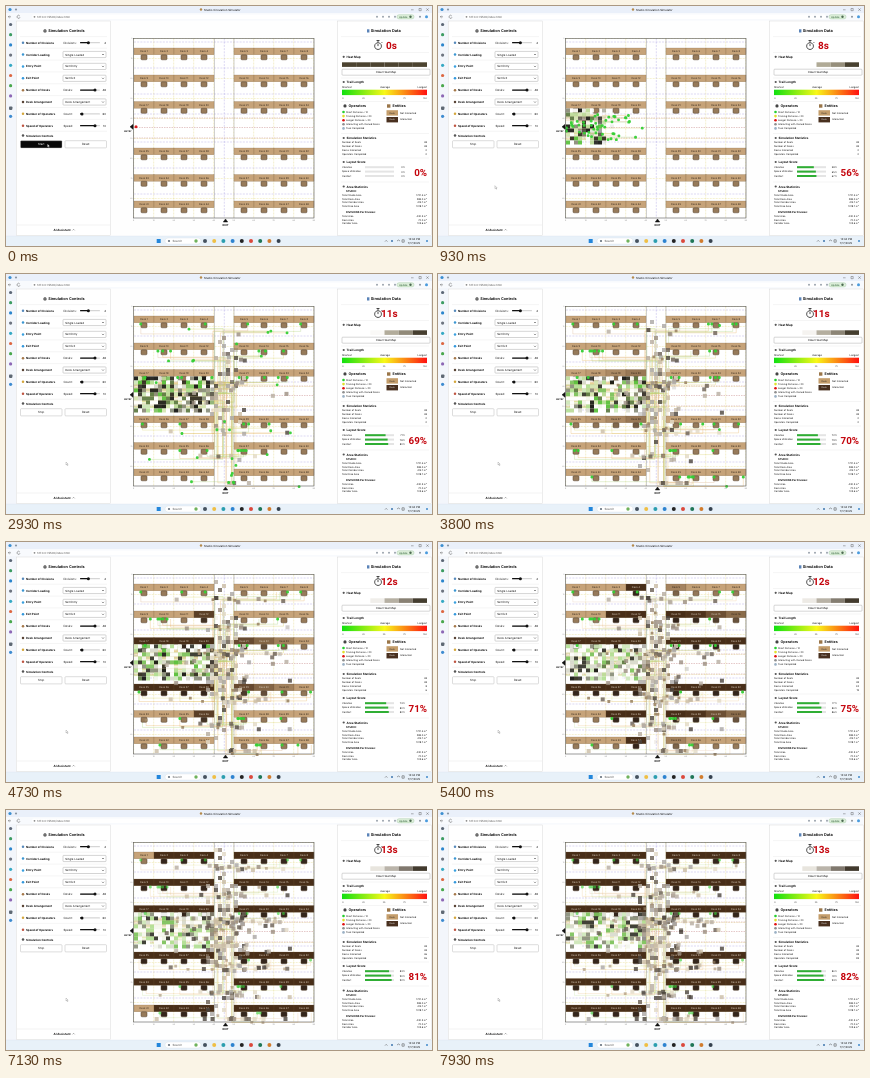
Write an HTML page that moves like this. It is 426 by 240 pixels and loops after 8 s.

```html
<!DOCTYPE html>
<html lang="en">
<head>
<meta charset="utf-8">
<title>Studio Circulation Simulator</title>
<style>
html, body { margin: 0; width: 100%; height: 100%; overflow: hidden; background: #fdfdfd; }
svg { display: block; width: 100vw; height: 100vh; font-family: Inter, "Open Sans", sans-serif; }
text { text-rendering: geometricPrecision; }
</style>
</head>
<body>
<svg id="stage" viewBox="0 0 426 240"></svg>
<script>
const LOOP = 8000, STEP = 1000 / 15;
const stage = document.getElementById('stage');

function el(tag, attrs, parent = stage) {
  const node = document.createElementNS('http://www.w3.org/2000/svg', tag);
  for (const k in attrs) node.setAttribute(k, attrs[k]);
  parent.append(node);
  return node;
}
const group = () => el('g', {});
const rect = (x, y, width, height, fill, more, parent) =>
  el('rect', { x, y, width, height, fill, ...more }, parent);
const dot = (cx, cy, r, fill, parent) => el('circle', { cx, cy, r, fill }, parent);
const path = (d, stroke, more, parent) =>
  el('path', { d, stroke, fill: 'none', 'stroke-width': 0.5, ...more }, parent);
function text(x, y, str, size = 2.6, more, parent) {
  const node = el('text', { x, y, 'font-size': size, fill: '#111', ...more }, parent);
  node.textContent = str;
  return node;
}
const bold = { 'font-weight': 700 };
const mid = { 'text-anchor': 'middle' };
const end = { 'text-anchor': 'end' };
const clamp = (v, a = 0, b = 1) => Math.max(a, Math.min(b, v));
const hash = n => { const s = Math.sin(n * 127.1 + 11.7) * 43758.5453; return s - Math.floor(s); };
const pick = (list, r) => list[Math.floor(r * list.length)];

// Piecewise linear value through [time, value] pairs
function along(points, t) {
  for (let i = 1; i < points.length; i++) {
    const [t0, a] = points[i - 1], [t1, b] = points[i];
    if (t <= t1) return a + (b - a) * clamp((t - t0) / (t1 - t0));
  }
  return points[points.length - 1][1];
}
function mix(a, b, k) {
  return 'rgb(' + a.map((v, i) => Math.round(v + (b[i] - v) * k)).join() + ')';
}

function drawBrowser() {
  rect(0, 0, 426, 240, '#fefefe');
  rect(0, 0, 426, 7, '#eaf0fa');
  rect(0, 7, 426, 7.5, '#f8fafd');
  rect(0, 14, 10, 216, '#f3f6fb');
  rect(26, 8.5, 362, 4.6, '#fff', { rx: 2.3 });
  dot(4, 3.5, 1.6, '#3d8fd0');
  dot(10, 3.5, 1.1, '#8a96a4');
  dot(195, 3.5, 1.2, '#b58a4c');
  text(198, 4.6, 'Studio Circulation Simulator', 2.8);
  path('M405 3.8h2.6M413 2.5h2.2v2.2h-2.2zM420.3 2.4l2.4 2.4m0-2.4l-2.4 2.4', '#444', { 'stroke-width': 0.4 });
  path('M5 10.8h-2.6l1.1-1.1m-1.1 1.1l1.1 1.1M13.8 10a1.5 1.5 0 1 0 .2 1.2', '#555');
  dot(28.5, 10.8, 0.9, '#888');
  text(31, 11.8, '127.0.0.1:5500/index.html', 2.8, { fill: '#555' });
  for (let i = 0; i < 4; i++) dot(371 + i * 6, 10.8, 1, '#9aa3ad');
  rect(391, 8.7, 17, 4.2, '#dff0dc', { rx: 2.1, stroke: '#7ab07a', 'stroke-width': 0.3 });
  text(393, 11.8, 'Update', 2.5, { fill: '#285c30' });
  dot(404.5, 10.8, 1.2, '#4b6a50');
  dot(414, 10.8, 1, '#8a929c');
  dot(420.5, 10.8, 1.5, '#4a9bdd');
  ['#5b6675', '#3c9c62', '#2b85cc', '#6d7480', '#36a9c4', '#dd6640', '#49a84c', '#8d67b5', '#5f6974', '#3e8bd0']
    .forEach((c, i) => i === 8 ? rect(3, 100.5, 3.4, 3.4, c, { rx: 0.8 }) : dot(4.6, 18.5 + i * 10.2, 1.6, c));

  rect(0, 230, 426, 10, '#e8f1f9');
  path('M0 230H426', '#d3deea', { 'stroke-width': 0.3 });
  rect(150.7, 233, 4, 4, '#2386db');
  rect(159, 232, 36, 6, '#fff', { rx: 3, stroke: '#cdd6e0', 'stroke-width': 0.3 });
  dot(163, 235, 1.1, '#64707c');
  text(166.5, 236, 'Search', 2.9, { fill: '#555' });
  dot(190, 235, 1.7, '#6fb25c');
  ['#45525f', '#efbf45', '#2b9eaf', '#2d83d0', '#232323', '#db483c', '#1f7657', '#d17c2d', '#36424f']
    .forEach((c, i) => dot(199 + i * 9.2, 235, 2, c));
  path('M379 235.6l1.2-1.2 1.2 1.2', '#444');
  dot(386, 235, 1, '#3e74ad');
  path('M391 235q1.5-2 3 0M396 233.8v2.4h2.2v-2.4z', '#444');
  text(414, 234.4, '12:34 PM', 2.6, end);
  text(414, 237.8, '7/17/2025', 2.6, end);
  dot(421, 235, 1, '#4088ca');
}

function slider(y, label, value, k) {
  text(57.5, y + 1, label, 2.9);
  rect(74, y - 0.6, 20, 1.2, '#d5d5d5', { rx: 0.6 });
  rect(74, y - 0.6, 20 * k, 1.2, '#111', { rx: 0.6 });
  dot(74 + 20 * k, y, 1.5, '#111');
  text(100, y + 1, value, 2.8, end);
}
function select(y, value) {
  rect(57, y - 3.1, 43, 6.2, '#fff', { stroke: '#a8a8a8', 'stroke-width': 0.5, rx: 0.7 });
  text(59.3, y + 1, value, 2.8);
  path(`M96 ${y - 0.5}l1 1 1-1`, '#222', { 'stroke-width': 0.5 });
}

function drawControls() {
  rect(10.5, 15, 94, 214.5, '#fff', { stroke: '#cfcfcf', 'stroke-width': 0.4 });
  dot(39, 24.9, 1.6, '#333');
  dot(39, 24.9, 0.6, '#fff');
  text(42.3, 26.3, 'Simulation Controls', 3.8, bold);
  path('M14 30.6H101', '#ddd', { 'stroke-width': 0.3 });
  const rows = ['Number of Divisions', 'Corridor Loading', 'Entry Point', 'Exit Point', 'Number of Desks',
    'Desk Arrangement', 'Number of Operators', 'Speed of Operators', 'Simulation Controls'];
  const tints = ['#5689bb', '#3b96d2', '#39a0df', '#3297dc', '#a47748', '#5b4638', '#d4a63c', '#be5542', '#555'];
  rows.forEach((label, i) => {
    const y = i < 8 ? 36.7 + i * 11.86 : 129.6;
    dot(17, y, 1.25, tints[i]);
    text(20, y + 1, label, 2.85, bold);
    if (i < 8) path(`M14 ${y + 5.5}H101`, '#ddd', { 'stroke-width': 0.3 });
  });
  slider(36.7, 'Divisions:', 4, 0.42);
  select(48.5, 'Single Loaded');
  select(60.4, 'Set Entry');
  select(72.3, 'Set Exit');
  slider(84.1, 'Desks:', 48, 0.75);
  select(96, 'Desk Arrangement');
  slider(107.9, 'Count:', 60, 0.1);
  slider(119.7, 'Speed:', 10, 0.75);
  path('M11 219H104', '#ddd', { 'stroke-width': 0.4 });
  text(56, 224.8, 'AI Assistant', 2.9, { ...mid, ...bold });
  path('M66.5 224.4l1.1-1.1 1.1 1.1', '#333', { 'stroke-width': 0.4 });
}

function button(x) {
  const box = rect(x, 134.7, 41.5, 7.2, '#fff', { rx: 0.8, stroke: '#aaa', 'stroke-width': 0.4 });
  const label = text(x + 20.75, 139.3, 'Reset', 2.9, mid);
  return { box, label };
}

const divider = y => path(`M335 ${y}H423`, '#ddd', { 'stroke-width': 0.3 });
function heading(y, label, x = 340.5) {
  dot(x - 2.8, y - 1, 1.1, '#555');
  text(x, y, label, 3, bold);
}
const SMALL = 2.4;
function drawData() {
  rect(331.5, 15, 94.2, 214.5, '#fff', { stroke: '#cfcfcf', 'stroke-width': 0.4 });
  rect(361, 23.3, 2.4, 3.2, '#5a83b8');
  text(364.8, 26.3, 'Simulation Data', 3.9, bold);
  divider(30.6);
  path('M373.5 37.2a3.4 3.4 0 1 0 .1 0M372 35h3M373.5 35v2M373.5 40.6v-2.2M377 36.6l.8.8', '#222', { 'stroke-width': 0.8, transform: 'translate(-1.5 -.5)' });
  divider(46.5);
  heading(51.8, 'Heat Map');
  rect(336, 63.2, 88, 6, '#fff', { stroke: '#999', 'stroke-width': 0.4, rx: 0.8 });
  text(380, 67.2, 'Clear Heat Map', 2.8, mid);
  divider(72);
  heading(77, 'Trail Length');
  text(336, 82, 'Shortest', 2.5);
  text(379, 82, 'Average', 2.5, mid);
  text(421, 82, 'Longest', 2.5, end);
  const grad = el('linearGradient', { id: 'trail' }, el('defs', {}));
  ['#10e010', '#f8f818', '#ff1010'].forEach((c, i) => el('stop', { offset: i / 2, 'stop-color': c }, grad));
  rect(336, 83.7, 85, 5.4, 'url(#trail)');
  ['0', '25', '50', '75', '100'].forEach((s, i) => text(337 + i * 20.5, 92.8, s, 2.1, mid));
  divider(95.5);
  dot(339, 99.9, 1.6, '#444');
  text(342.5, 101.3, 'Operators', 3.6, bold);
  rect(381, 98.3, 3.4, 3.4, '#9a7649');
  text(386.5, 101.3, 'Entities', 3.6, bold);
  [['#25cf30', 'Short Distance < 10'], ['#e0e02a', 'Training Distance < 20'], ['#e01010', 'Longer Distance > 20'],
   ['#8e8e8e', 'Interacting with Owned Desks'], ['#9ab0c4', 'Task Completed']].forEach(([c, s], i) => {
    dot(337.5, 106 + i * 4.1, 1.3, c);
    text(340, 106.9 + i * 4.1, s, SMALL);
  });
  [['#c49d6b', 'Not Interacted'], ['#49301f', 'Interacted']].forEach(([c, s], i) => {
    rect(380.5, 104.2 + i * 6.8, 11.5, 5.4, c);
    text(386.2, 107.6 + i * 6.8, 'Desk', 2.2, { ...mid, fill: i ? '#eee' : '#222' });
    text(394, 107.6 + i * 6.8, s, SMALL);
  });
  divider(127.5);
  heading(133, 'Simulation Statistics');
  ['Number of Seats', 'Number of Desks', 'Desks Interacted', 'Operators Completed']
    .forEach((s, i) => text(336, 137.2 + i * 3.8, s, SMALL));
  divider(152);
  heading(157, 'Layout Score');
  ['Vibration', 'Space Utilization', 'Comfort'].forEach((s, i) => text(336, 162 + i * 4.4, s, SMALL));
  divider(176);
  heading(181.5, 'Area Statistics');
  text(340, 186, 'STUDIO:', 2.6, bold);
  text(340, 206.8, 'DIVISIONS Per Division:', 2.6, bold);
  const area = (y, s, v) => { text(336, y, s, SMALL); text(421, y, v + ' m²', SMALL, end); };
  area(189.8, 'Total Studio Area', '1721.4');
  area(193.5, 'Total Desk Area', '288.0');
  area(197.2, 'Total Corridor Area', '414.7');
  area(200.9, 'Total Free Area', '1018.7');
  area(210.8, 'Total Area', '430.3');
  area(214.5, 'Desk Area', '72.0');
  area(218.2, 'Corridor Area', '103.6');
}

const deskRows = [42, 69, 95.5, 142, 168.5, 195];
function drawPlan() {
  rect(127.5, 32.5, 180.5, 179.5, '#fff');
  for (let i = 0; i <= 9; i++) {
    const x = 127.7 + i * 20, y = 32.5 + i * 20;
    path(`M${x} 32.5V212`, '#e6da80', { 'stroke-width': 0.4, 'stroke-dasharray': '2 1' });
    if (i < 9) path(`M127.7 ${y}H308`, '#e6da80', { 'stroke-width': 0.35, 'stroke-dasharray': '2 1' });
    text(x, 214.5, i * 10, 1.9, { ...mid, fill: '#777' });
    if (i < 9) text(126.5, y + 0.7, i * 10, 1.8, { ...end, fill: '#888' });
  }
  [36, 62, 88, 108, 136, 162, 188].forEach(y =>
    path(`M128 ${y}H308`, '#a79de0', { 'stroke-width': 0.4, 'stroke-dasharray': '2 1.2' }));
  path('M128 112H308M128 132H308M128 121.5H308', '#bd7878', { 'stroke-width': 0.4, 'stroke-dasharray': '1.5 1' });
  path('M208.5 32.5V212M228 32.5V212', '#999', { 'stroke-width': 0.45 });
  path('M218.3 32.5V212', '#a79de0', { 'stroke-width': 0.4, 'stroke-dasharray': '2 1.2' });
}

const tan = [198, 163, 121], dark = [72, 46, 24], seat = [150, 122, 90], darkSeat = [52, 38, 28];
const desks = [];
function makeDesks() {
  const g = group();
  deskRows.forEach((y, row) => {
    const far = row < 3 ? 2 - row : row - 3;
    for (let n = 0; n < 8; n++) {
      const left = n < 4, i = n % 4, x = (left ? 128 : 228) + i * 20;
      const out = left ? 3 - i : i;
      // Desks near the crossing are reached first, the outer corners last
      const at = left
        ? 3600 + far * 600 + out * [80, 600, 600][far] + (far === 2 && !i ? 600 : 0)
        : 4250 + far * 500 + out * 130;
      const top = rect(x, y, 20, 6.8, '', { stroke: '#6f5435', 'stroke-width': 0.2 }, g);
      const chair = rect(x + 7, y + 6.8, 6, 5, '', { rx: 1, stroke: '#54422e', 'stroke-width': 0.5 }, g);
      const label = text(x + 10, y + 4.3, 'Desk ' + (row * 8 + n + 1), 2.5, mid, g);
      desks.push({ at, top, chair, label });
    }
  });
}

const early = ['#12120e', '#2f2c1e', '#5d7a42', '#57c03a', '#d5e6b4', '#fff', '#fff', '#8b8a78', '#1c1c16', '#bcdc98'];
const late = ['#fff', '#cfe9bc', '#d9dcd0', '#34352c', '#7dc45e', '#fff', '#8a907c', '#b2e094', '#f5f8ee', '#fff'];
const walk = ['#cbbda6', '#9b8e80', '#6b6054', '#b7ada0', '#e3dac6', '#aaa7a4', '#4c443c'];
const cells = [];
function makeCells(g) {
  let id = 0;
  const add = (x, y, birth, crowd) => cells.push({
    id: ++id, birth, crowd, node: rect(x, y, 4, 4, '#fff', { opacity: 0 }, g)
  });
  for (let c = 0; c < 20; c++) for (let r = 0; r < 9; r++)
    if (hash(c * 31 + r * 7) < 0.88) add(128 + c * 4, 102.5 + r * 4, 150 + c * 48 + hash(c + r * 50) * 500, true);
  for (let c = 0; c < 10; c++) for (let r = 0; r < 44; r++) {
    const y = 34 + r * 4, off = Math.abs(y - 125);
    if (hash(c * 77 + r * 13 + 5) < 0.6 - off / 260 - Math.abs(c - 3) * 0.07)
      add(200 + c * 4, y, 700 + off * 22 + hash(c * 9 + r) * 3600, false);
  }
  for (let i = 0; i < 130; i++) {
    const side = hash(i + 300) < 0.35 ? -1 : 1;
    const x = 220 + side * hash(i + 900) * hash(i + 1300) * 82;
    const y = hash(i + 500) < 0.45 ? 104 + hash(i + 700) * 38 : pick(deskRows, hash(i + 600)) + 11 + hash(i + 800) * 6;
    add(x, Math.min(207, y), 1100 + hash(i + 400) * 5800, false);
  }
}

const operators = [];
function makeOperators(trails, dots) {
  for (let i = 0; i < 60; i++) {
    const y0 = 107 + hash(i + 20) * 27, cx = 205 + hash(i + 40) * 26;
    const row = pick(deskRows, hash(i + 60)), right = hash(i + 80) < 0.6;
    const ry = row + 12 + hash(i + 90) * 6;
    const dx = (right ? 238 : 138) + 20 * Math.floor(hash(i + 110) * 4) + (hash(i + 120) - 0.5) * 16;
    const pts = [[128, y0], [cx, y0], [cx, ry], [dx, ry], [dx, row + 8]];
    const lens = pts.slice(1).map((p, k) => Math.abs(p[0] - pts[k][0]) + Math.abs(p[1] - pts[k][1]));
    operators.push({
      pts, lens, total: lens.reduce((a, b) => a + b), start: 100 + hash(i + 130) * 1100,
      speed: 0.072 + hash(i + 150) * 0.03, returns: hash(i + 160) < 0.55,
      line: path('', pick(['#e6b060', '#d8d468', '#d9b08e', '#a8cf78'], hash(i + 170)), { 'stroke-width': 0.4 }, trails),
      node: rect(0, 0, 2.8, 2.8, '#35cf35', {}, dots)
    });
  }
}
function pointAt(op, dist) {
  let d = 'M' + op.pts[0];
  for (let k = 0; k < op.lens.length; k++) {
    const [x0, y0] = op.pts[k], [x1, y1] = op.pts[k + 1];
    const f = op.lens[k] ? clamp(dist / op.lens[k]) : 1;
    const x = x0 + (x1 - x0) * f, y = y0 + (y1 - y0) * f;
    d += `L${x.toFixed(1)} ${y.toFixed(1)}`;
    if (dist <= op.lens[k] || k === op.lens.length - 1) return { x, y, d };
    dist -= op.lens[k];
  }
}

drawBrowser();
drawControls();
const start = button(14.5);
button(59);
drawData();
drawPlan();
const trailLayer = group();
makeDesks();
makeCells(group());
makeOperators(trailLayer, group());

rect(127.5, 32.5, 180.5, 179.5, 'none', { stroke: '#555', 'stroke-width': 0.6 });
path('M124 120.8l3-2.4v4.8z', '#111', { fill: '#111' });
text(122, 126, 'ENTRY', 2.2, { ...mid, ...bold });
const entryDot = dot(130, 120.8, 1.5, '#d81c1c');
path('M219.5 213l2.2 3h-4.4z', '#111', { fill: '#111' });
text(219.5, 220, 'EXIT', 2.7, { ...mid, ...bold });

const W = 85 / 6;
const heatBar = Array.from({ length: 6 }, (_, i) => rect(336 + i * W, 56.3, W, 4.6, '#4c4330'));
const white = [255, 255, 255];
const rampStart = [white, white, white, [176, 170, 150], [150, 143, 124], [72, 65, 48]];
const rampEnd = [white, white, [232, 229, 222], [186, 180, 170], [128, 120, 110], [66, 58, 46]];
const big = { ...bold, fill: '#c4040c', 'font-family': 'Roboto, sans-serif' };
const clock = text(375, 42.6, '', 10, big);
const score = text(421, 169.6, '', 9.8, { ...big, ...end });
const stats = [0, 1, 2, 3].map(i => text(421, 137.2 + i * 3.8, '', SMALL, end));
const bars = [0, 1, 2].map(i => {
  const y = 160.2 + i * 4.4;
  rect(359, y, 29, 2, '#e4e4e4');
  return { fill: rect(359, y, 0, 2, '#2fae34'), label: text(399, y + 1.9, '', SMALL, end) };
});
const pointer = el('path', { d: 'M0 0v3l.7-.6.6 1.2.5-.2-.6-1.2h1z', fill: '#fff', stroke: '#555', 'stroke-width': 0.25 });

function update(t) {
  const on = t > 60;
  start.box.setAttribute('fill', on ? '#fff' : '#080808');
  start.label.setAttribute('fill', on ? '#222' : '#fff');
  start.label.textContent = on ? 'Stop' : 'Start';
  entryDot.setAttribute('opacity', on ? 0 : 1);
  const move = clamp((t - 200) / 900), ease = move * move * (3 - 2 * move);
  pointer.setAttribute('transform', `translate(${41.5 + 18.5 * ease} ${138 + 50 * ease})`);

  // The counter slows as the plan fills up
  const secs = Math.floor(10.4 * (1 - Math.exp(-t / 500)) + 0.4 * t / 1000);
  clock.textContent = secs + 's';
  clock.setAttribute('x', secs < 10 ? 380 : 375);
  const total = Math.round(along([[0, 0], [130, 45], [1800, 69], [2930, 69], [4730, 71], [6000, 79], [7130, 81], [7930, 82]], t));
  score.textContent = total + '%';
  bars.forEach(({ fill, label }, i) => {
    const v = on ? Math.min(100, Math.round(total + [2, 9, 11][i])) : 0;
    fill.setAttribute('width', 29 * v / 100);
    label.textContent = v + '%';
  });
  const warm = clamp((t - 1800) / 4500);
  heatBar.forEach((n, i) => n.setAttribute('fill', on ? mix(rampStart[i], rampEnd[i], warm) : '#4c4330'));

  let done = 0;
  for (const d of desks) {
    const k = clamp((t - d.at) / 550);
    if (k === 1) done++;
    d.top.setAttribute('fill', mix(tan, dark, k));
    d.chair.setAttribute('fill', mix(seat, darkSeat, k));
    d.label.setAttribute('fill', k > 0.5 ? '#d8cbbb' : '#33261a');
  }
  [48, 48, done, Math.floor(done * 0.8)].forEach((v, i) => stats[i].textContent = v);

  for (const c of cells) {
    const age = t - c.birth;
    c.node.setAttribute('opacity', on ? clamp(age / 200) * (c.crowd ? 0.92 : 0.8) : 0);
    if (age <= 0) continue;
    const epoch = Math.floor(t / (c.crowd ? 650 : 2200) + hash(c.id));
    const r = hash(c.id * 3.7 + epoch * 19);
    const list = c.crowd ? (hash(c.id + 33) < (t - 1800) / 4000 ? late : early) : walk;
    c.node.setAttribute('fill', pick(list, r));
  }

  for (const op of operators) {
    const gone = (t - op.start) * op.speed;
    const shown = on && gone > 0;
    op.node.setAttribute('opacity', shown ? (t > 6500 ? 0.6 : 0.95) : 0);
    op.line.setAttribute('d', shown ? pointAt(op, Math.min(gone, op.total)).d : '');
    op.line.setAttribute('opacity', t > 5000 ? 0.5 : 0.8);
    if (!shown) continue;
    // After a stay at the desk, some walk back to the corridor and return
    const leg = op.total - op.lens[0], extra = op.returns ? Math.max(0, gone - op.total - 90) : 0;
    const back = leg - Math.abs(leg - extra % (2 * leg));
    const p = pointAt(op, Math.min(gone, op.total) - back);
    op.node.setAttribute('x', p.x - 1.4);
    op.node.setAttribute('y', p.y - 1.4);
    op.node.setAttribute('rx', extra ? 0.2 : 1.2);
    op.node.setAttribute('fill', extra ? '#a18b6c' : '#35cf35');
  }
}

const origin = performance.now();
function tick() {
  const t = (performance.now() - origin) % LOOP;
  update(Math.floor(t / STEP) * STEP);
  requestAnimationFrame(tick);
}
tick();
</script>
</body>
</html>
```
